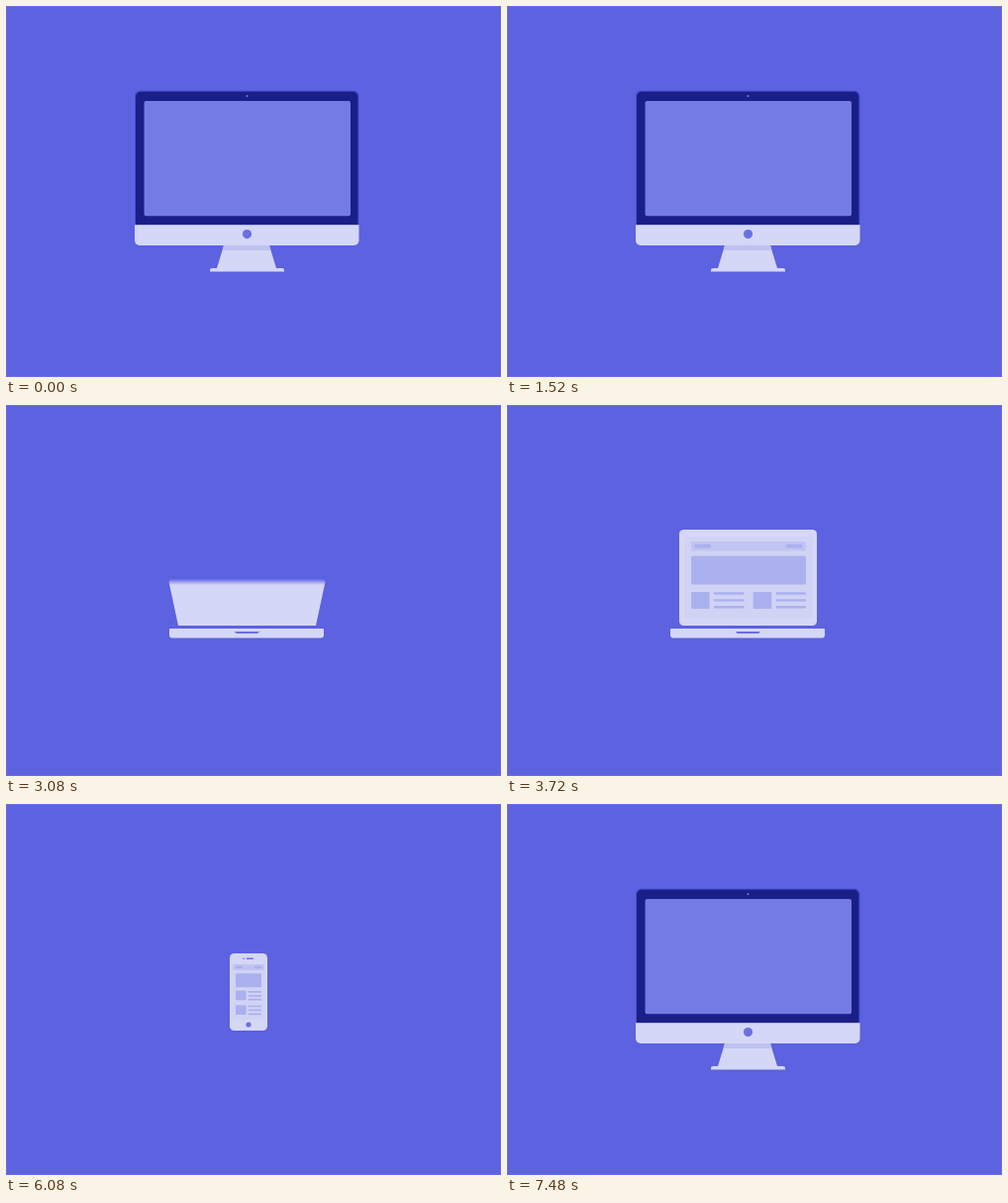
Recreate the animation shown at these times as an HTML page with a canvas. Size 500x375 px, loop 7560 ms.

```html
<!DOCTYPE html>
<html lang="en">
<head>
<meta charset="utf-8">
<title>Responsive devices</title>
<style>
  html, body { margin: 0; width: 100%; height: 100%; overflow: hidden; background: #5c62e0; }
  canvas { display: block; width: 500px; height: 375px; }
</style>
</head>
<body>
<canvas id="stage" width="500" height="375"></canvas>
<script>
const LOOP = 7560, STEP = 40, QUARTER = Math.PI / 2;
const BACK = '#5c62e0', EDGE = '#666ce3', LIGHT = '#d4d7f6', BLOCK = '#abb0ee', BAR = '#c0c4f1';
const PANEL = '#cccff4', INK = '#6b71df', DARK = '#1a1f88', SCREEN = '#747be5';
const g = document.getElementById('stage').getContext('2d');

const part = (t, a, b) => Math.min(1, Math.max(0, (t - a) / (b - a)));
const inOut = x => x < .5 ? 2 * x * x : 1 - 2 * (1 - x) ** 2;
const easeOut = x => 1 - (1 - x) ** 3;
const move = (t, a, b) => inOut(part(t, a, b));
const mix = (a, b, p) => a.map((v, i) => v + (b[i] - v) * p);

// x, y, width, height, stacked cards, right chip
const PAGE = {
  desktop: [151, 100, 185, 100, 0, 1],
  laptop: [186, 138, 116, 68, 0, 1],
  tablet: [214, 143, 63.5, 49, 0, 0],
  upright: [221, 134, 49, 82, 1, 1],
  phone: [232, 162, 26, 51, 1, 1]
};
// x, y, width, height, speaker and button
const BODY = {
  laptop: [195, 105, 97, 139, 0],
  tablet: [203, 118, 84.5, 109, 1],
  phone: [226, 151, 38, 78, 1]
};
const CHIN = [130, 221.3, 226.5, 20.7], DECK = [165, 226, 156, 9.5], TUCKED = [205, 203, 81, 8];

function box(x, y, w, h, r, fill) {
  if (w <= 0 || h <= 0) return;
  g.fillStyle = fill;
  g.beginPath();
  g.roundRect(x, y, w, h, r);
  g.fill();
}

function dot(x, y, r, fill) {
  box(x - r, y - r, r * 2, r * 2, r, fill);
}

function poly(fill, ...points) {
  g.fillStyle = fill;
  g.beginPath();
  points.forEach(p => g.lineTo(...p));
  g.fill();
}

function fade(alpha, draw) {
  const before = g.globalAlpha;
  g.globalAlpha *= alpha;
  draw();
  g.globalAlpha = before;
}

function placed(x, y, angle, draw) {
  g.save();
  g.translate(x, y);
  g.rotate(angle);
  draw();
  g.restore();
}

// Fill whose upper edge is smeared by its speed
function smear(top, blur, color) {
  if (blur < .5) return color;
  const fill = g.createLinearGradient(0, top - blur / 2, 0, top + blur / 2);
  fill.addColorStop(0, color + '00');
  fill.addColorStop(1, color);
  return fill;
}

function page([x, y, w, h, stack, rightChip], lift = () => 0) {
  const bar = 5 + w * .038, hero = w * (.25 + .29 * stack);
  const thumb = 7 + stack + w * .1, tall = thumb * .92, cards = tall * (1 + 1.5 * stack);
  const gap = Math.min(5.2, (h - bar - hero - cards) / 2);
  const top = y - lift(0), chip = 4 + w * .105, pad = Math.min(6, bar * .4);
  const lineX = thumb + Math.max(2, w * .037), column = w * (.46 + .54 * stack);

  box(x - 3 * stack, top, w + 6 * stack, bar, 1, BAR);
  box(x + pad * (1 - stack), top + bar * .3, chip, bar * .4, 1, BLOCK);
  fade(rightChip, () => box(x + w - chip - pad * (1 - stack), top + bar * .3, chip, bar * .4, 1, BLOCK));
  box(x, y + bar + gap - lift(1), w, hero, w / 60, BLOCK);
  for (let c = 0; c < 2; c++) {
    const cx = x + c * w * .54 * (1 - stack);
    const cy = y + h - cards + c * tall * 1.5 * stack - lift(2 + c);
    box(cx, cy, thumb, tall, 1, BLOCK);
    for (let i = 0; i < 3; i++) {
      box(cx + lineX, cy + .4 + i * tall * .4, column - lineX, 1.5 + w / 120, .5, BLOCK);
    }
  }
}

function device([x, y, w, h, detail], angle, panel = 1) {
  const side = w * .075, end = 5 + 6 * detail;
  placed(x + w / 2, y + h / 2, angle, () => {
    box(-w / 2, -h / 2, w, h, 4.5, LIGHT);
    fade(panel * .45, () => box(side - w / 2, end - h / 2, w - side * 2, h - end * 2, 0, PANEL));
    fade(detail, () => {
      dot(-5, 5.2 - h / 2, .8, INK);
      box(-2.5, 4.4 - h / 2, 7.5, 1.6, .8, INK);
      dot(0, h / 2 - 6, 2.6, INK);
    });
  });
}

function desktop(top, blur, stand, lit) {
  if (stand > 0) {
    const foot = 242 + 23 * stand, shade = 242 + 5 * stand;
    poly(LIGHT, [220, 242], [266, 242], [273, foot], [213, foot]);
    poly('#bec2f0', [220, 242], [266, 242], [267.5, shade], [218.5, shade]);
    box(206, foot, 75, 3.5 * stand, [2, 2, 0, 0], LIGHT);
  }
  const start = top - blur / 2, height = 221.3 - start;
  if (top > 220) return;
  box(130, start - .5, 226.5, height + .5, [5, 5, 0, 0], smear(top, blur, '#4750d6'));
  box(131, start + .5, 224.5, height - .5, [5, 5, 0, 0], smear(top, blur, DARK));
  fade(1 - part(blur, 0, 4), () => dot(243.5, top + 5, 1.1, SCREEN));
  const screen = fill => box(139.5, top + 10, 208.5, 202.3 - top, 2, fill);
  screen(SCREEN);
  fade(lit, () => screen(LIGHT));
}

function base(p, logo) {
  const [x, y, w, h] = mix(CHIN, DECK, p);
  box(x, y, w, h, [p, p, 5 - 2 * p, 5 - 2 * p], LIGHT);
  fade(logo, () => dot(243.5, y + h * .45, 4.6, INK));
}

const foldTop = t => 86 + 135.3 * move(t, 1600, 2100);

function opening(t) {
  const angle = QUARTER * (1 - move(t, 2880, 3432));
  const zoom = 1 / (1 - 97 * Math.sin(angle) / 738);
  return { top: 223 - 97 * Math.cos(angle) * zoom, half: 69.5 * zoom };
}

function monitorPart(t) {
  const on = 1 - part(t, 1200, 1520);
  const lift = i => 200 * (1 - easeOut(part(t, 80 + i * 40, 560 + i * 40)));
  desktop(foldTop(t), foldTop(t + 12) - foldTop(t - 12), 1 - move(t, 1600, 1880), part(t, 40, 280) * on);
  base(move(t, 2080, 2440), 1 - part(t, 2080, 2240));
  fade(part(t, 80, 400) * on, () => page(PAGE.desktop, lift));
}

function laptopPart(t) {
  const p = move(t, 4000, 4360), shown = part(t, 3420, 3720);
  const [x, y, w, h] = mix(DECK, TUCKED, p);
  box(x, y, w, h, [1, 1, 3, 3], LIGHT);
  fade(part(t, 2880, 3000) * (1 - part(p, 0, .3)), () =>
    poly(INK, [x + w * .42, y + 3], [x + w * .585, y + 3], [x + w * .57, y + 5], [x + w * .435, y + 5]));
  if (t < 3432) {
    const { top, half } = opening(t), blur = opening(t - 8).top - opening(t + 8).top;
    const start = top - blur / 2;
    poly(smear(top, blur, LIGHT), [174, 223], [243.5 - half, start + 3], [246 - half, start],
      [241 + half, start], [243.5 + half, start + 3], [313, 223]);
  } else {
    device(mix(BODY.laptop, BODY.tablet, p), -QUARTER, shown);
    fade(shown, () => page(mix(PAGE.laptop, PAGE.tablet, p)));
  }
}

function tabletPart(t) {
  const p = move(t, 4930, 5300), angle = p * QUARTER, cx = 245.25, cy = 172.5;
  const turnedPage = (layout, turn, alpha) => placed(cx, cy, turn, () => {
    g.translate(-cx, -cy);
    fade(alpha, () => page(layout));
  });
  device(BODY.tablet, angle - QUARTER);
  turnedPage(PAGE.tablet, angle, 1 - p);
  turnedPage(PAGE.upright, angle - QUARTER, p);
}

function phonePart(t) {
  const p = move(t, 5520, 6080);
  placed(0, 235 * part(t, 6400, 6680) ** 2, 0, () => {
    device(mix(BODY.tablet, BODY.phone, p), 0);
    page(mix(PAGE.upright, PAGE.phone, p));
  });
  placed(0, -275 * (1 - easeOut(part(t, 6480, 7000))), 0, () => {
    desktop(86, 0, 1, 0);
    base(0, 1);
  });
}

function frame() {
  const t = Math.floor((performance.now() - start) % LOOP / STEP) * STEP;
  g.fillStyle = BACK;
  g.fillRect(0, 0, 500, 375);
  g.strokeStyle = EDGE;
  g.strokeRect(.5, .5, 499, 374);
  if (t < 2880) monitorPart(t);
  else if (t < 4400) laptopPart(t);
  else if (t < 5400) tabletPart(t);
  else phonePart(t);
  requestAnimationFrame(frame);
}

const start = performance.now();
frame();
</script>
</body>
</html>
```
